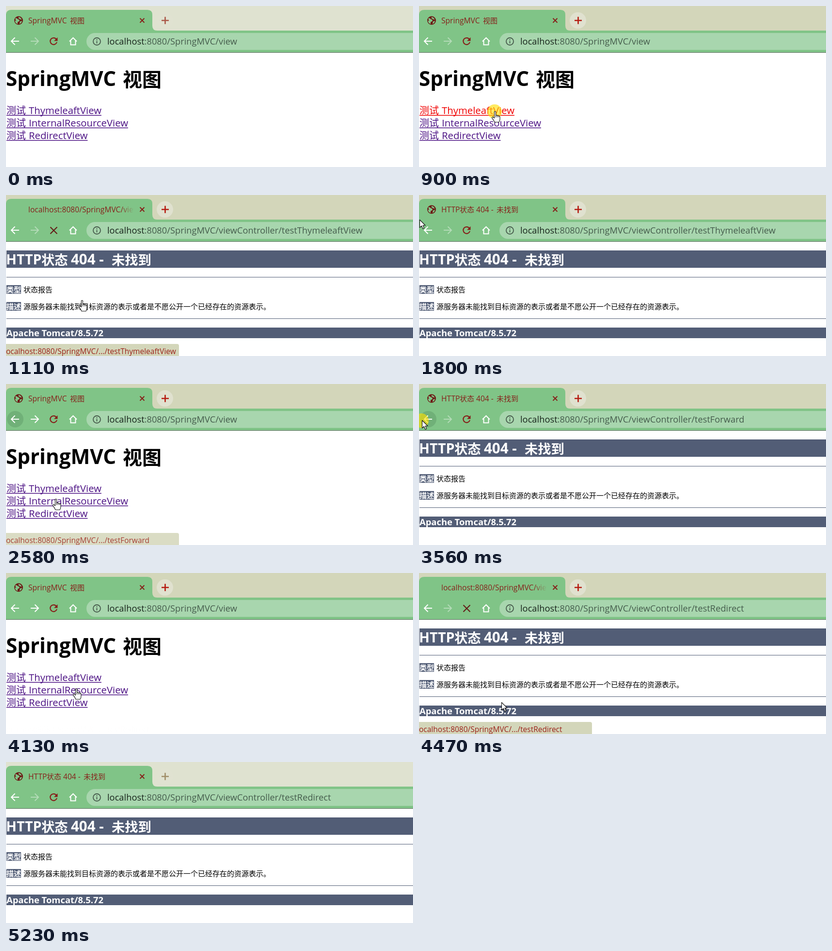
Write an HTML page with a canvas that moves like this. It is 840x334 px and loops after 5300 ms.

```html
<!DOCTYPE html>
<html lang="zh-CN">
<head>
<meta charset="utf-8">
<title>SpringMVC 视图</title>
<style>
  html, body { margin: 0; width: 100%; height: 100%; overflow: hidden; background: #fff; }
  canvas { display: block; }
</style>
</head>
<body>
<canvas id="stage" width="840" height="334"></canvas>
<script>
const ctx = document.getElementById('stage').getContext('2d');
const LOOP = 5300;
const LATIN = '"Open Sans", "Noto Sans", "Noto Sans CJK SC", sans-serif';
const HAN = '"Noto Sans CJK SC", "Noto Sans CJK", "Noto Sans", sans-serif';
const GREEN = '#80c487', SLATE = '#525d76', RED = '#86201a', LINK = '#4c1284';

const LINKS = ['ThymeleaftView', 'InternalResourceView', 'RedirectView'];

// Each visit to the error page: link press, page shown, tab loaded, page left.
const VISITS = [
  { link: 0, path: 'testThymeleaftView', press: 830, open: 1050, loaded: 1250, leave: 2080, status: [950, 1400] },
  { link: 1, path: 'testForward', press: 2920, open: 3050, loaded: 3200, leave: 3650, status: [2480, 3320] },
  { link: 2, path: 'testRedirect', press: 4290, open: 4400, loaded: 4550, leave: LOOP, status: [4130, 4780] }
];

const PATH = [
  [70, 584, 316], [550, 190, 213], [640, 157, 218], [1180, 157, 218],
  [1660, 6, 46], [1800, 1, 51], [1900, 7, 75], [2300, 7, 75],
  [2560, 103, 238], [3060, 103, 238], [3360, 6, 75], [3980, 6, 75],
  [4180, 170, 268], [4500, 170, 268], [4890, 626, 336]
];
const HANDS = [[600, 1180], [2500, 3060], [4130, 4410]];
const BACK_CLICKS = [[1940, 2050], [3490, 3610]];
const BACK_HOVER = [[1850, 2620], [3370, 4060]];

const within = (t, spans) => spans.some(([a, b]) => t >= a && t < b);
const clamp = v => Math.max(0, Math.min(1, v));

function text(str, x, y, size, color, { font = LATIN, weight = 400 } = {}) {
  ctx.font = `${weight} ${size}px ${font}`;
  ctx.fillStyle = color;
  ctx.fillText(str, x, y);
  return x + ctx.measureText(str).width;
}

const han = (str, x, y, size, color, weight = 400) =>
  text(str, x, y, size, color, { font: HAN, weight });

function rect(x, y, w, h, color) {
  ctx.fillStyle = color;
  ctx.fillRect(x, y, w, h);
}

function disc(x, y, r, color) {
  ctx.fillStyle = color;
  ctx.beginPath();
  ctx.arc(x, y, r, 0, Math.PI * 2);
  ctx.fill();
}

function stroke(d, color, width = 2) {
  ctx.strokeStyle = color;
  ctx.lineWidth = width;
  ctx.stroke(new Path2D(d));
}

function fill(d, color) {
  ctx.fillStyle = color;
  ctx.fill(new Path2D(d));
}

function cursorAt(t) {
  if (t < PATH[0][0] || t > PATH[PATH.length - 1][0]) return null;
  const i = Math.max(1, PATH.findIndex(p => p[0] >= t));
  const [t0, x0, y0] = PATH[i - 1], [t1, x1, y1] = PATH[i];
  const k = (t - t0) / (t1 - t0), e = k * k * (3 - 2 * k);
  return [x0 + (x1 - x0) * e, y0 + (y1 - y0) * e];
}

function drawCursor(t) {
  const pos = cursorAt(t);
  if (!pos) return;
  const pressing = VISITS.some(v => t >= v.press && t < v.open) || within(t, BACK_CLICKS);
  if (pressing) disc(pos[0] - 1, pos[1] + 1, 15, 'rgba(255,222,0,0.62)');
  ctx.save();
  ctx.translate(Math.round(pos[0]), Math.round(pos[1]));
  ctx.lineJoin = 'round';
  const d = within(t, HANDS)
    ? 'M-1.5 1.5Q0 -.5 1.5 1.5V9Q3 7.5 4.5 9.5Q6 8 7.5 10.5Q10 9.5 10 12V17Q10 20 8 23H-1Q-3 18 -6 15Q-7 12 -4.5 12L-1.5 14.5Z'
    : 'M.5 .5V16.5L4.3 13L7 19.2L9.6 18L7 12H12Z';
  fill(d, '#fff');
  stroke(d, '#111', 1.1);
  if (within(t, HANDS)) stroke('M1.5 9V13M4.5 10V13M7.5 11V13', '#111', 1);
  ctx.restore();
}

function drawGlobe() {
  disc(26, 30, 9, '#6d1a16');
  fill('M19 26Q22 24 24 27L28 29L27 32L24 33L24 37Q19 36 18.5 30L21 31Z', GREEN);
  fill('M26 22.5L31 25L32 29L29 27L26 26Z', GREEN);
  fill('M29 32L33 31Q32 36 28 37Z', GREEN);
}

function errorTitle(x, y) {
  text('HTTP', x, y, 15.6, RED);
  han('状态', x + 38, y, 15, RED);
  text('404 -', x + 72, y, 15.6, RED);
  han('未找到', x + 114, y, 15, RED);
}

function drawTab(t, visit, loading) {
  const active = t >= 760 && t < 5200;
  rect(0, 0, 840, 51, active ? '#d3d6ba' : '#dfe2d0');
  fill('M0 51V17Q1 8 11 8H292Q302 8 302 18V41Q302 51 312 51Z', GREEN);

  if (loading) {
    const fade = ctx.createLinearGradient(236, 0, 264, 0);
    fade.addColorStop(0, RED);
    fade.addColorStop(1, 'rgba(134,32,26,0)');
    text('localhost:8080/SpringMVC/view', 46, 36, 15.6, fade);
  } else {
    drawGlobe();
    if (visit) errorTitle(46, 36);
    else {
      text('SpringMVC', 46, 36, 15.6, RED);
      han('视图', 132, 36, 15, RED);
    }
  }
  stroke('M276.5 25.5L285.5 34.5M285.5 25.5L276.5 34.5', RED, 2);
  disc(328, 30, 17, active ? '#e0e1cf' : '#e0e2d1');
  const plus = active ? '#b51a10' : t < 760 ? '#ab5748' : '#a08e68';
  stroke('M321 30H336M328.5 22.5V37.5', plus, 2.6);
}

function drawToolbar(t, visit, loading) {
  rect(0, 51, 840, 45, GREEN);
  rect(0, 96, 840, 1, '#5d6a60');
  if (within(t, BACK_HOVER)) disc(19, 73, 17, '#70b078');

  const arrow = 'M11 73H27M18.5 65.5L11 73L18.5 80.5';
  stroke(arrow, '#fff');
  ctx.save();
  ctx.translate(78, 0);
  ctx.scale(-1, 1);
  const canForward = !visit && t > VISITS[0].leave;
  stroke(arrow, canForward ? '#fff' : 'rgba(255,255,255,0.4)');
  ctx.restore();

  if (loading) stroke('M91.5 66.5L105.5 80.5M105.5 66.5L91.5 80.5', '#641f1a', 2.2);
  else {
    stroke('M104 69A7 7 0 1 0 105 75', RED, 2.2);
    fill('M106.5 65V72.5H99Z', RED);
  }
  stroke('M131 73.5L138.5 66L146 73.5M133.5 72V80.5H143.5V72', '#fff', 2);

  fill('M183.5 56H840V91H183.5A17.5 17.5 0 0 1 183.5 56Z', '#a8d6ae');
  stroke('M195 73.5A7.5 7.5 0 1 0 180 73.5A7.5 7.5 0 1 0 195 73.5M187.5 72.5V77.5M187.5 69V71', '#465a4b', 1.8);
  const x = text('localhost', 209, 80, 18.3, '#17231a');
  text(':8080/SpringMVC/' + (visit ? 'viewController/' + visit.path : 'view'), x, 80, 18.3, '#455c4c');
}

function drawHome(t) {
  text('SpringMVC', 0, 166, 42.2, '#000', { weight: 700 });
  han('视图', 241, 167, 40, '#000', 700);
  LINKS.forEach((name, i) => {
    const y = 224 + i * 26;
    const pressed = VISITS.some(v => v.link === i && t >= v.press && t < v.open);
    const color = pressed ? '#f00000' : LINK;
    han('测试', 1, y, 20, color);
    const end = text(name, 47, y, 20.3, color);
    rect(1, y + 2, end - 1, 1.5, color);
  });
}

function drawError() {
  rect(1, 115, 839, 36, SLATE);
  const bold = { weight: 700 };
  text('HTTP', 0, 144, 28.6, '#fff', bold);
  han('状态', 73, 145, 27.3, '#fff', 700);
  text('404 -', 134, 144, 29.5, '#fff', bold);
  han('未找到', 218, 145, 27.3, '#fff', 700);
  rect(1, 170, 839, 1, SLATE);
  rect(1, 256, 839, 1, SLATE);
  [
    ['类型', '状态报告'],
    ['描述', '源服务器未能找到目标资源的表示或者是不愿公开一个已经存在的资源表示。']
  ].forEach(([label, body], i) => {
    const y = 202 + i * 35;
    rect(1, y - 15, 30, 18, SLATE);
    han(label, 1, y, 15, '#fff', 700);
    han(body, 36, y, 15, '#000');
  });
  rect(1, 275, 839, 22, SLATE);
  text('Apache Tomcat/8.5.72', 1, 293, 18.4, '#fff', bold);
}

function drawStatus(t) {
  for (const { status: [from, to], path } of VISITS) {
    const alpha = Math.min(clamp((t - from) / 120), clamp((to - t) / 120));
    if (!alpha) continue;
    ctx.save();
    ctx.globalAlpha = alpha;
    const box = new Path2D('M0 309H353Q357 309 357 313V334H0Z');
    ctx.fillStyle = '#d3d6ba';
    ctx.fill(box);
    ctx.clip(box);
    text('ocalhost:8080/SpringMVC/.../' + path, 0, 330, 15.5, '#9c231b');
    ctx.restore();
  }
}

function draw(t) {
  const visit = VISITS.find(v => t >= v.open && t < v.leave);
  const loading = visit && t < visit.loaded;
  rect(0, 0, 840, 334, '#fff');
  drawTab(t, visit, loading);
  drawToolbar(t, visit, loading);
  if (visit) drawError();
  else drawHome(t);
  drawStatus(t);
  drawCursor(t);
}

const start = performance.now();
function tick() {
  draw((performance.now() - start) % LOOP);
  requestAnimationFrame(tick);
}
tick();
</script>
</body>
</html>
```
